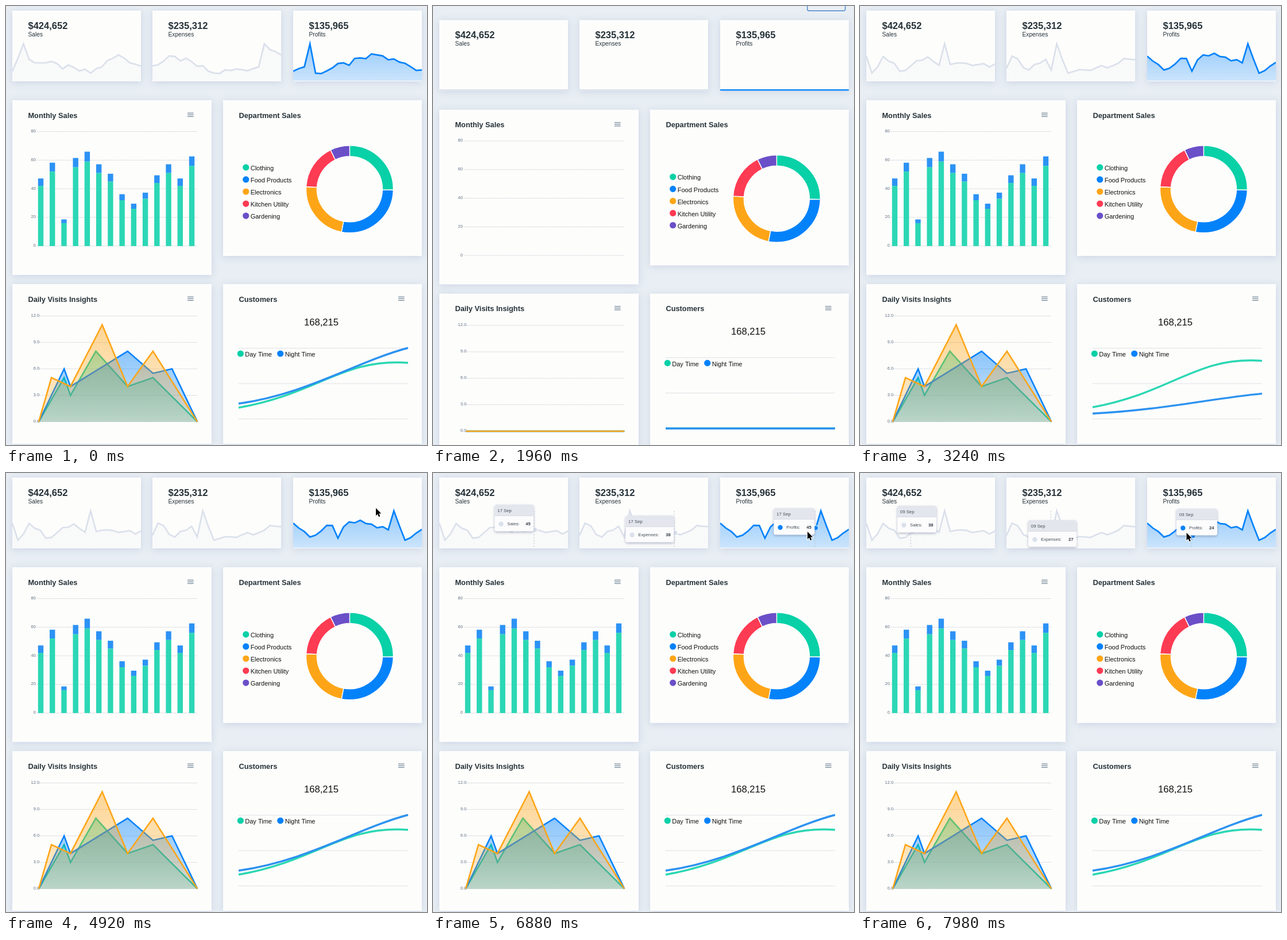
An HTML page with a canvas for the animation above (8 s loop, 733x764 px).

```html
<!DOCTYPE html>
<html lang="en">
<head>
<meta charset="utf-8">
<title>Sales dashboard</title>
<style>
  html, body { margin: 0; width: 100%; height: 100%; overflow: hidden; background: #e8eef3; }
  canvas { display: block; width: 733px; height: 764px; }
</style>
</head>
<body>
<canvas id="stage"></canvas>
<script>
const W = 733, H = 764, LOOP = 8000, RELOAD = 1960;
const canvas = document.getElementById('stage');
const ratio = window.devicePixelRatio || 1;
canvas.width = W * ratio;
canvas.height = H * ratio;
const ctx = canvas.getContext('2d');

const FONT = '"Liberation Sans", Arial, sans-serif';
const PAGE = '#e8eef3', INK = '#263238', BLACK = '#111', AXIS = '#5f6f80';
const TEAL = '8,208,167', BLUE = '4,130,250', ORANGE = '254,165,23', RED = '253,59,83', PURPLE = '106,79,200';
const PALE = '219,225,235';
const rgb = (c, a = 1) => `rgba(${c},${a})`;

const clamp = v => Math.max(0, Math.min(1, v));
const lerp = (a, b, k) => a + (b - a) * k;
const smooth = k => k * k * (3 - 2 * k);
const span = (t, a, b) => clamp((t - a) / (b - a));
const easeOutBack = k => 1 + 2.70158 * (k - 1) ** 3 + 1.70158 * (k - 1) ** 2;
const noise = n => { const s = Math.sin(n * 12.9898) * 43758.5453; return (s - Math.floor(s)) * 2 - 1; };

// Value that starts at `from` and eases through moves [start, end, target]
const moves = (from, list, t) => list.reduce((v, [a, b, to]) => lerp(v, to, smooth(span(t, a, b))), from);

function text(str, x, y, size, { color = INK, weight = 400, align = 'left' } = {}) {
  ctx.font = `${weight} ${size}px ${FONT}`;
  ctx.fillStyle = color;
  ctx.textAlign = align;
  ctx.fillText(str, x, y);
}

function dot(x, y, r, color) {
  ctx.fillStyle = color;
  ctx.beginPath();
  ctx.arc(x, y, r, 0, Math.PI * 2);
  ctx.fill();
}

function rule(x0, y0, x1, y1, color, dash = []) {
  ctx.strokeStyle = color;
  ctx.lineWidth = 1;
  ctx.setLineDash(dash);
  ctx.beginPath();
  ctx.moveTo(x0, y0);
  ctx.lineTo(x1, y1);
  ctx.stroke();
  ctx.setLineDash([]);
}

function box(x, y, w, h, radius, fill, shadow, blur) {
  ctx.save();
  ctx.shadowColor = shadow;
  ctx.shadowBlur = blur * ratio;
  ctx.shadowOffsetY = 2 * ratio;
  ctx.fillStyle = fill;
  ctx.beginPath();
  ctx.roundRect(x, y, w, h, radius);
  ctx.fill();
  ctx.restore();
}

function card(x, y, w, h, title, hasMenu) {
  box(x, y, w, h, 0, '#fdfdfc', 'rgba(140,152,200,.3)', 12);
  if (title) text(title, x + 27.4, y + 31, 12.8, { weight: 700 });
  if (!hasMenu) return;
  ctx.fillStyle = '#6e8192';
  for (let i = 0; i < 3; i++) ctx.fillRect(x + 305, y + 21.8 + i * 3, 10.6, 1.2);
}

function legend(label, x, y, color) {
  dot(x, y, 5.6, rgb(color));
  text(label, x + 8, y + 5.2, 11, { color: BLACK });
}

function grid(x, y, gap, labels, labelX) {
  labels.forEach((label, i) => {
    rule(x, y + i * gap, 333.5, y + i * gap, '#d3d3da', [2, 1]);
    text(label, labelX, y + i * gap + 1.5, 7.4, { align: 'right', color: AXIS });
  });
}

function area(points, base, color, width, a0, a1) {
  const line = new Path2D();
  points.forEach(([x, y]) => line.lineTo(x, y));
  const shape = new Path2D(line);
  shape.lineTo(points[points.length - 1][0], base);
  shape.lineTo(points[0][0], base);
  const top = Math.min(...points.map(p => p[1]));
  const grad = ctx.createLinearGradient(0, top, 0, base);
  grad.addColorStop(0, rgb(color, a0));
  grad.addColorStop(1, rgb(color, a1));
  ctx.fillStyle = grad;
  ctx.fill(shape);
  ctx.strokeStyle = rgb(color);
  ctx.lineWidth = width;
  ctx.stroke(line);
}

// 24 daily values: straight runs between key points, with seeded jitter
function series(seed, keys) {
  const data = [];
  for (let k = 1; k < keys.length; k++) {
    const [a, va] = keys[k - 1], [b, vb] = keys[k];
    for (let i = a; i <= b; i++) {
      const jitter = i === a || i === b ? 0 : noise(seed + i) * 8;
      data[i] = lerp(va, vb, (i - a) / (b - a)) + jitter;
    }
  }
  return data;
}

const STEP = 224 / 23, SPARK_BASE = 130;
const sparkY = v => SPARK_BASE - v * 0.69;
const tiles = [
  {
    name: 'Sales', total: '$424,652', x: 11, color: PALE, fill: [.12, .12], tipW: 68, tipY: [55, 57],
    before: series(3, [[0, 24], [2, 93], [3, 54], [14, 19], [19, 65], [23, 37]]),
    after: series(5, [[0, 62], [1, 19], [3, 61], [6, 24], [8, 38], [11, 60], [13, 39], [14, 93], [15, 41], [17, 45], [23, 42]])
  },
  {
    name: 'Expenses', total: '$235,312', x: 255, color: PALE, fill: [.12, .12], tipW: 84, tipY: [74, 82],
    before: series(7, [[0, 37], [4, 61], [11, 19], [19, 35], [20, 93], [23, 65]]),
    after: series(9, [[0, 31], [1, 62], [4, 27], [7, 54], [8, 27], [9, 93], [11, 19], [17, 38], [23, 53]])
  },
  {
    name: 'Profits', total: '$135,965', x: 500, color: BLUE, fill: [.42, .2], tipW: 71, tipY: [61, 62],
    before: series(2, [[0, 24], [2, 35], [3, 93], [4, 19], [15, 65], [23, 27]]),
    after: series(4, [[0, 62], [3, 27], [7, 56], [8, 24], [10, 65], [13, 61], [17, 45], [18, 93], [20, 19], [23, 46]])
  }
];

function drawTile({ name, total, x, color, fill, before, after }, t, grow) {
  card(x, 8, 224, 123);
  text(total, x + 27.5, 39.8, 16.5, { weight: 700 });
  text(name, x + 27.5, 53, 10.2);
  ctx.save();
  ctx.beginPath();
  ctx.rect(x, 8, 224, 123);
  ctx.clip();
  const data = t < RELOAD ? before : after;
  area(data.map((v, i) => [x + i * STEP, sparkY(v * grow)]), SPARK_BASE, color, 2.7, ...fill);
  ctx.restore();
}

function drawTip({ name, x, color, tipW, tipY, after }, t) {
  const sweep = smooth(span(t, 6950, 7980));
  const settle = smooth(span(t, 5350, 6170));
  const idx = Math.round(lerp(17, 8, smooth(span(t, 6950, 7850))));
  const pos = lerp(lerp(15.3, 17.1, settle), 8.2, sweep);
  const left = x + lerp(lerp(147, 164.3, settle), 122, sweep) - tipW;
  const top = lerp(tipY[0], tipY[1], sweep);
  const i = Math.floor(pos);
  const markY = sparkY(lerp(after[i], after[i + 1], pos - i));
  const cross = x + idx * STEP - 0.6;

  ctx.save();
  ctx.globalAlpha = span(t, 5350, 5500);
  rule(cross, 66, cross, 131, '#c0c3cd', [2.5, 2.5]);
  dot(x + pos * STEP, markY, 4.6, '#fff');
  dot(x + pos * STEP, markY, 3.7, rgb(color));
  box(left, top, tipW, 46.5, 3.5, '#fcfcfd', 'rgba(110,120,150,.5)', 4);
  ctx.fillStyle = '#e4e6ed';
  ctx.beginPath();
  ctx.roundRect(left, top, tipW, 19.5, [3.5, 3.5, 0, 0]);
  ctx.fill();
  rule(left, top + 19.5, left + tipW, top + 19.5, '#d8dbe3');
  const day = String(Math.min(idx + 1, 17)).padStart(2, '0');
  text(`${day} Sep`, left + 4.8, top + 12.8, 7.8, { color: '#444c55' });
  dot(left + 11.3, top + 33.8, 4.2, rgb(color));
  text(`${name}:`, left + 22, top + 36.4, 7.7, { color: '#444c55' });
  text(Math.round(after[idx]), left + tipW - 5.5, top + 36.4, 7.7, { weight: 700, align: 'right', color: '#333b44' });
  ctx.restore();
}

const monthly = [42, 52, 16, 55, 59, 51, 45, 32, 26, 33, 44, 51, 42, 56];

function drawBars(age) {
  card(11, 164, 347, 304, 'Monthly Sales', true);
  grid(54, 218.5, 49.8, ['80', '60', '40', '20', '0'], 51.8);
  monthly.forEach((v, i) => {
    const unit = 2.493 * smooth(span(age, i * 18, i * 18 + 500));
    const x = 55.8 + i * 20.23, y = 417.8 - v * unit, extra = (1 + v * 0.1) * unit;
    ctx.fillStyle = '#2c92f5';
    ctx.fillRect(x, y - extra, 9.4, extra);
    ctx.fillStyle = '#2cd7b5';
    ctx.fillRect(x, y, 9.4, v * unit);
  });
}

const shares = [
  ['Clothing', 21, TEAL], ['Food Products', 23, BLUE], ['Electronics', 19, ORANGE],
  ['Kitchen Utility', 14, RED], ['Gardening', 6, PURPLE]
];
const shareSum = shares.reduce((sum, [, value]) => sum + value, 0);

function drawRing() {
  card(378, 164, 346, 271, 'Department Sales');
  let from = -Math.PI / 2;
  shares.forEach(([name, value, color], i) => {
    const to = from + value / shareSum * Math.PI * 2;
    ctx.beginPath();
    ctx.arc(598.4, 318.8, 76, from, to);
    ctx.arc(598.4, 318.8, 57, to, from, true);
    ctx.closePath();
    ctx.fillStyle = rgb(color);
    ctx.fill();
    ctx.strokeStyle = '#fff';
    ctx.lineWidth = 1.4;
    ctx.stroke();
    from = to;
    legend(name, 417.7, 280.9 + i * 21.05, color);
  });
}

// Points as [day, visits]
const visits = [
  [TEAL, [[0, 0], [4, 5], [5, 3], [9, 8], [14, 4], [18, 5], [25, 0]]],
  [BLUE, [[0, 0], [4, 6], [5, 4], [14, 8], [18, 5.5], [21, 6], [25, 0]]],
  [ORANGE, [[0, 0], [2, 5], [5, 4], [10, 11], [14, 4], [18, 8], [25, 0]]]
];

function drawVisits(age) {
  card(11, 484, 347, 278, 'Daily Visits Insights', true);
  grid(57, 539.5, 46, ['12.0', '9.0', '6.0', '3.0', '0.0'], 58);
  visits.forEach(([color, pts], i) => {
    const unit = 15.35 * smooth(span(age, i * 60, i * 60 + 600));
    area(pts.map(([d, v]) => [57 + d * 11.05, 723.6 - v * unit]), 723.6, color, 2.6, .45, .18);
  });
}

// One bezier per line, scaled up from the base line
function curve(y0, x1, y1, x2, y2, y3, k, color) {
  const y = v => lerp(718.8, v, k);
  ctx.strokeStyle = color;
  ctx.lineWidth = 3.4;
  ctx.beginPath();
  ctx.moveTo(405, y(y0));
  ctx.bezierCurveTo(x1, y(y1), x2, y(y2), 700, y(y3));
  ctx.stroke();
}

function drawCustomers(t) {
  card(378, 484, 346, 278, 'Customers', true);
  text('168,215', 549, 556, 16.6, { align: 'center', color: BLACK });
  for (let i = 0; i < 3; i++) rule(405, 595.5 + i * 61.6, 700, 595.5 + i * 61.6, '#d3d3da', [2, 1]);
  legend('Day Time', 408.3, 605, TEAL);
  legend('Night Time', 477.7, 605, BLUE);
  const rise = start => t < RELOAD ? 1 : easeOutBack(span(t, start, start + 1100));
  curve(699, 545, 674, 585, 613, 621, rise(2327), '#2bd7b3');
  curve(692, 525, 675, 610, 619, 595, rise(3147), '#2c92f0');
}

function drawCursor(t) {
  const x = moves(652, [[4480, 4880, 644], [5300, 5700, 673.5], [6150, 6650, 652], [6980, 7960, 568.5]], t);
  const y = moves(-22, [[4480, 4880, 61], [5300, 5700, 83], [6150, 6650, 102], [6980, 7960, 104]], t);
  const arrow = [[0, 0], [0, 13.2], [3, 10.4], [5.1, 15.2], [7.3, 14.2], [5.3, 9.6], [9.3, 9.4]];
  ctx.beginPath();
  arrow.forEach(([dx, dy]) => ctx.lineTo(x + dx, y + dy));
  ctx.closePath();
  ctx.strokeStyle = '#fff';
  ctx.lineWidth = 2;
  ctx.stroke();
  ctx.fillStyle = '#000';
  ctx.fill();
}

function draw(t) {
  const age = t < RELOAD ? LOOP : t - RELOAD;
  const grow = smooth(span(age, 0, 720));
  ctx.setTransform(ratio, 0, 0, ratio, 0, 0);
  ctx.fillStyle = PAGE;
  ctx.fillRect(0, 0, W, H);
  ctx.save();
  ctx.translate(0, moves(0, [[20, 400, 16.4], [RELOAD, 2380, 0]], t));
  ctx.strokeStyle = '#2c74c4';
  ctx.lineWidth = 1.2;
  ctx.beginPath();
  ctx.roundRect(651.8, -36, 66, 28, 3);
  ctx.stroke();
  tiles.forEach(tile => drawTile(tile, t, grow));
  drawBars(age);
  drawRing();
  drawVisits(age);
  drawCustomers(t);
  if (t > 5350) tiles.forEach(tile => drawTip(tile, t));
  ctx.restore();
  drawCursor(t);
}

const start = performance.now();
function tick() {
  draw((performance.now() - start) % LOOP);
  requestAnimationFrame(tick);
}
tick();
</script>
</body>
</html>
```
